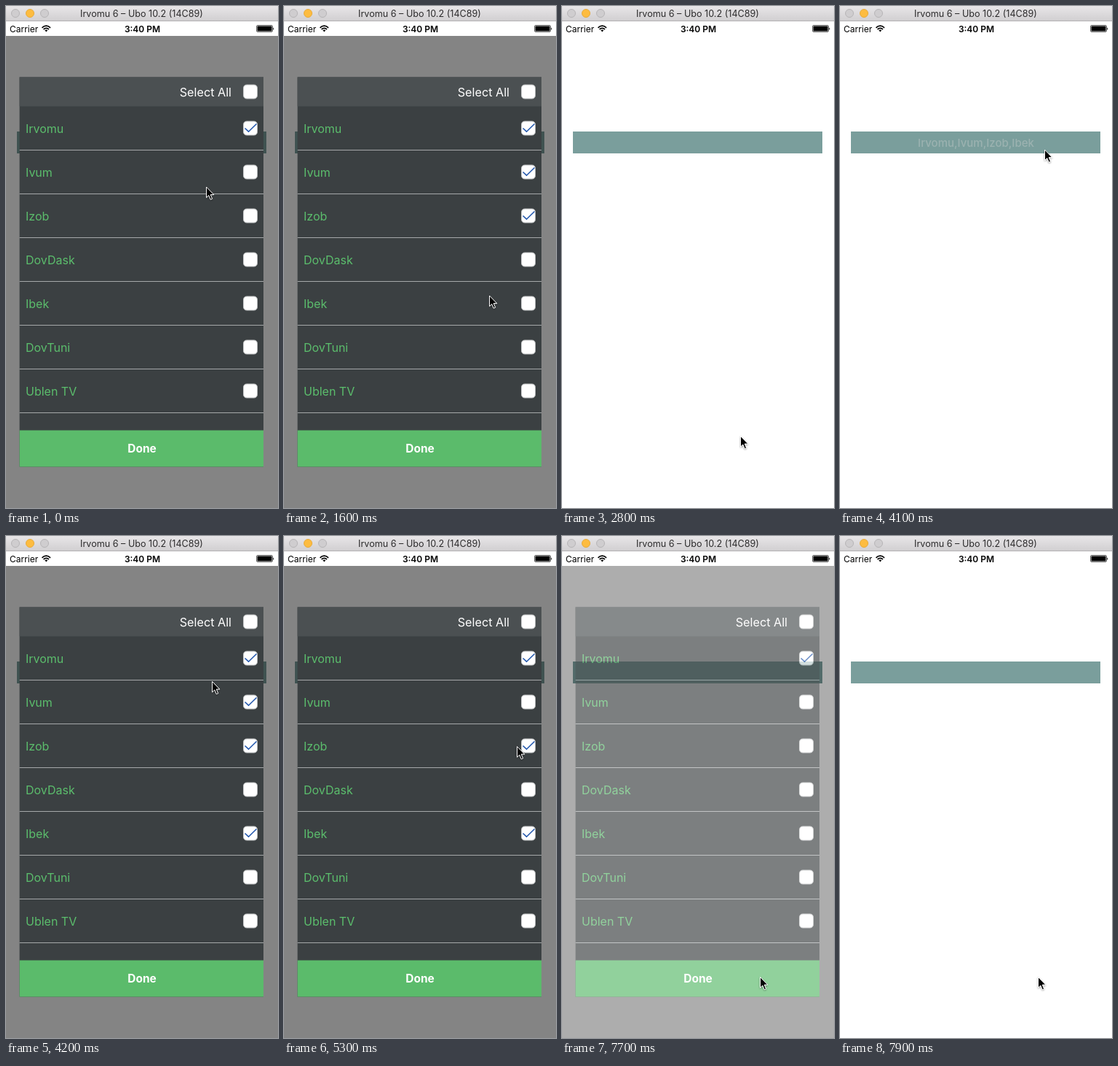
Write an HTML page that moves like this. It is 374x688 px and loops after 8 s.

```html
<!DOCTYPE html>
<html lang="en">
<head>
<meta charset="utf-8">
<title>Multi-select list</title>
<style>
  html, body { margin: 0; width: 100%; height: 100%; overflow: hidden; background: #fff; }
  svg { display: block; width: 100%; height: 100%; }
  text { font-family: Inter, Roboto, sans-serif; }
  .mid { text-anchor: middle; }
  .tick { fill: none; stroke: #2458ad; stroke-width: 1.6; }
  .box { fill: #fff; stroke: #c0c2c3; }
  .light { fill: #cfcdcf; stroke: #b7b5b7; }
</style>
</head>
<body>
<svg viewBox="0 0 374 688">
  <defs>
    <linearGradient id="bar" x2="0" y2="1">
      <stop stop-color="#e8e6e8"/>
      <stop offset="1" stop-color="#d1cfd1"/>
    </linearGradient>
    <filter id="shadow" x="-50%" y="-50%" width="200%" height="200%">
      <feDropShadow dx="0" dy="1" stdDeviation="1" flood-opacity=".4"/>
    </filter>
  </defs>

  <rect width="374" height="688" fill="#fff"/>
  <rect x="15" y="172" width="343" height="30" fill="#7a9e9c"/>
  <text id="summary" class="mid" x="187" y="192.5" font-size="15" font-weight="500"></text>

  <g id="modal">
    <rect y="41" width="374" height="647" opacity=".483"/>
    <rect x="18.6" y="97.5" width="335.4" height="534" fill="#3b4042"/>
    <rect x="18.6" y="97.5" width="335.4" height="40" fill="#4b5052"/>
    <text x="310" y="123.5" font-size="16.2" fill="#fff" text-anchor="end">Select All</text>
    <rect class="box" x="326.5" y="108" width="19" height="19" rx="4.5"/>
    <g id="rows"></g>
    <rect x="18.6" y="581.5" width="335.4" height="50" fill="#5bbb6b"/>
    <text class="mid" x="187" y="612" font-size="15.5" font-weight="700" fill="#fff">Done</text>
  </g>

  <rect width="374" height="20" fill="url(#bar)"/>
  <rect y="20" width="374" height="1" fill="#b3b1b3"/>
  <circle class="light" cx="13" cy="10" r="5.5"/>
  <circle cx="33" cy="10" r="5.5" fill="#fdbc40" stroke="#e8ab3a"/>
  <circle class="light" cx="53" cy="10" r="5.5"/>
  <text class="mid" x="186.5" y="15" font-size="12.6" fill="#2c2b2c">Irvomu 6 – Ubo 10.2 (14C89)</text>

  <rect y="21" width="374" height="20" fill="#fff"/>
  <text x="5" y="35.5" font-size="12">Carrier</text>
  <g fill="none" stroke="#000" stroke-width="1.7">
    <path d="M49.5 29.8q5.8-5.2 11.6 0M51.6 32q3.7-3.2 7.4 0"/>
    <path d="M53.3 33.3q2-1.6 4 0l-2 2.2z" fill="#000" stroke="none"/>
  </g>
  <text class="mid" x="187.5" y="35.5" font-size="12" font-weight="600">3:40 PM</text>
  <rect x="344.5" y="26.5" width="22" height="9" rx="1.5" fill="none" stroke="#000" stroke-width=".6"/>
  <rect x="345.5" y="27.5" width="20" height="7" rx=".6"/>
  <path d="M367.3 29.5q2 1.7 0 3.5z"/>

  <path id="cursor" d="M0 0V14.6L3.3 11.5L5.7 17.2L8.1 16.2L5.7 10.6H10.3Z"
        stroke="#fff" stroke-width="1" filter="url(#shadow)"/>
</svg>
<script>
const LOOP = 8000, STEP = 100, GLIDE = 700;
const $ = id => document.getElementById(id);

// Each item: label, then the times at which its tick flips.
const items = [
  { label: "Irvomu", on: true },
  { label: "Ivum", flips: [300, 5000] },
  { label: "Izob", flips: [900, 5400] },
  { label: "DovDask" },
  { label: "Ibek", flips: [1700, 6500] },
  { label: "DovTuni" },
  { label: "Ublen TV" }
];

// Places where the pointer comes to rest, with its time of arrival.
const stops = [
  { at: 0, x: 275.5, y: 248 },
  { at: 700, x: 283, y: 310 },
  { at: 1400, x: 282.5, y: 397 },
  { at: 2300, x: 245.5, y: 589.5 },
  { at: 3900, x: 281.5, y: 197 },
  { at: 4800, x: 319, y: 241 },
  { at: 5300, x: 320.5, y: 288.5 },
  { at: 6200, x: 321, y: 409 },
  { at: 6800, x: 293.5, y: 467 },
  { at: 7400, x: 272.5, y: 604.5 }
];

const clamp = k => Math.max(0, Math.min(1, k));
const ease = k => k * k * (3 - 2 * k);

// The pointer glides to each stop in the last moments before it is due.
function cursorAt(t) {
  const next = stops.findIndex(stop => stop.at > t);
  if (next < 0) return stops.at(-1);
  const from = stops[next - 1], to = stops[next];
  const duration = Math.min(GLIDE, to.at - from.at);
  const k = ease(clamp(1 - (to.at - t) / duration));
  return { x: from.x + (to.x - from.x) * k, y: from.y + (to.y - from.y) * k };
}

function modalOpacity(t) {
  const fadeOut = (start, end) => clamp((end - t) / (end - start));
  return t < 4200 ? fadeOut(2600, 2800) : fadeOut(7600, 7900);
}

const isOn = ({ on = false, flips = [] }, t) =>
  on !== (flips.filter(flip => flip <= t).length % 2 === 1);

$("rows").innerHTML = items.map(({ label }, i) => `
  <g transform="translate(0 ${137.5 + 60 * i})">
    <text x="27" y="36" font-size="16" fill="#5bbd6c">${label}</text>
    <rect class="box" x="326.5" y="20.5" width="19" height="19" rx="4.5"/>
    <path class="tick" d="M328.5 30l5 4.7L344.5 24"/>
    <rect x="18.6" y="59.5" width="335.4" height="1" fill="#a5a8a9"/>
  </g>`).join("");
const ticks = document.querySelectorAll(".tick");
$("summary").textContent = items.filter(item => isOn(item, 3000)).map(item => item.label).join(",");

function draw(now) {
  const t = Math.floor(now % LOOP / STEP) * STEP;
  const { x, y } = cursorAt(t);
  items.forEach((item, i) => ticks[i].style.display = isOn(item, t) ? "" : "none");
  $("modal").setAttribute("opacity", modalOpacity(t));
  $("summary").style.display = t >= 3000 && t < 4200 ? "" : "none";
  $("summary").setAttribute("fill", t < 4000 ? "#fff" : "#9bb2b0");
  $("cursor").setAttribute("transform", `translate(${x} ${y})`);
}

const start = performance.now();
function tick() {
  draw(performance.now() - start);
  requestAnimationFrame(tick);
}
tick();
</script>
</body>
</html>
```
